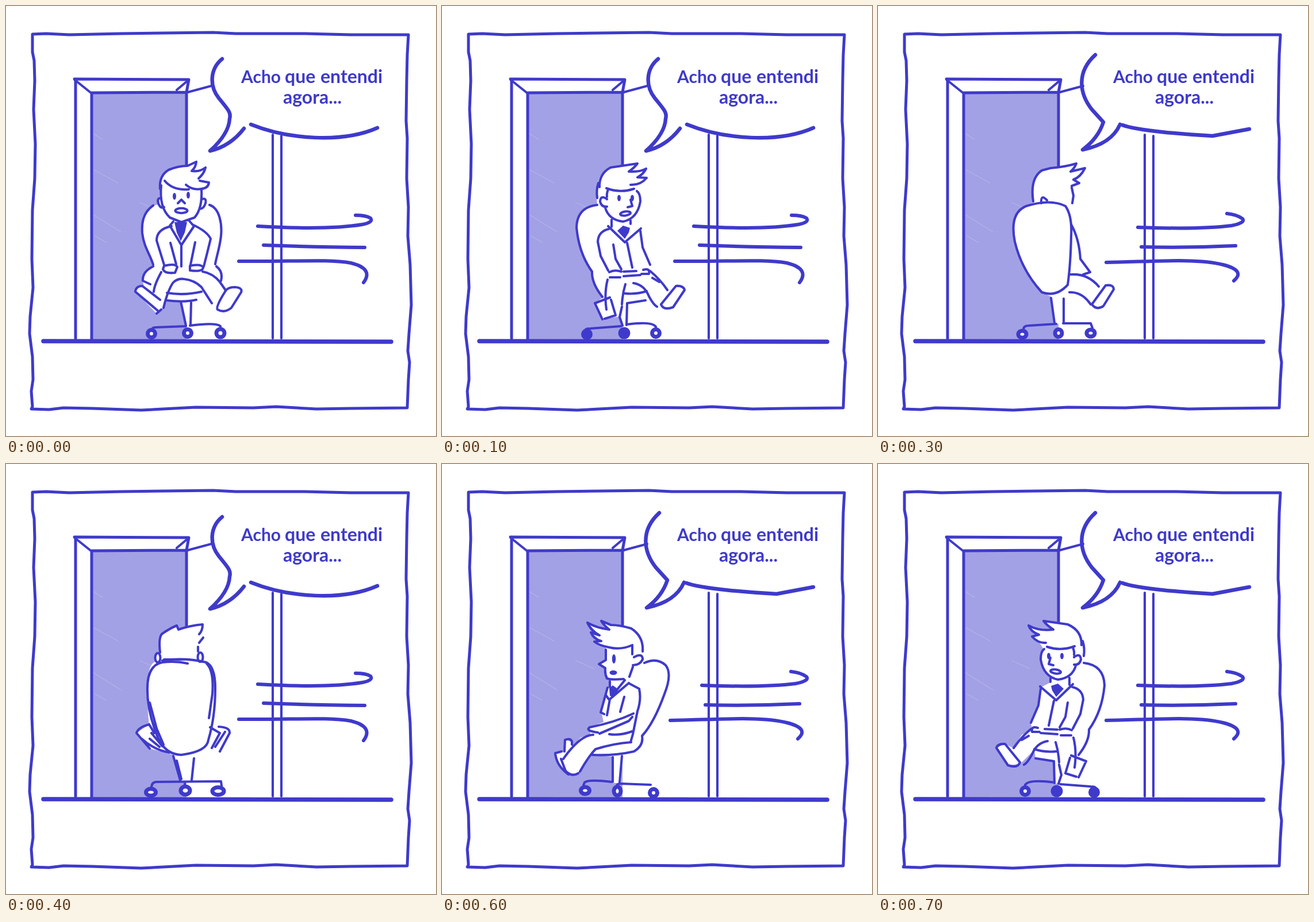
Recreate the animation shown at these times as an HTML page. Size 748 by 748 pixels, loop 0.8 s.

```html
<!DOCTYPE html>
<html lang="pt">
<head>
<meta charset="utf-8">
<title>Acho que entendi agora</title>
<style>
html, body { margin: 0; height: 100%; overflow: hidden; background: #fff; }
svg { display: block; width: 100vw; height: 100vh; }
path, circle, ellipse { fill: none; stroke: #3f3acb; stroke-width: 4.1; stroke-linecap: round; stroke-linejoin: round; }
.white { fill: #fff; stroke: none; }
.ink { fill: #3f3acb; stroke: none; }
.wheel { fill: #fff; stroke-width: 7; }
.door { fill: #a3a1e5; stroke: none; }
.streak { stroke: #b3b1ea; stroke-width: 1.2; }
.mid { stroke-width: 5; }
.wind { stroke-width: 6; }
.bold { stroke-width: 6.5; }
.floor { stroke-width: 7.5; }
text { font: 700 32px Lato, "Open Sans", sans-serif; fill: #3f3acb; }
.thin { font-size: 30px; }
</style>
</head>
<body>
<svg viewBox="0 0 748 748">
<defs>
  <g id="front">
    <path class="white" d="M268 318Q266 290 283 285L316 278 331 271 323 287 347 281 336 300 353 307Q352 317 341 319V336Q350 335 346 346L354 346C372 352 376 380 374 400L365 453Q378 462 374 478L381 493Q390 486 411 492L392 525Q378 537 366 527L340 490 340 497 331 511 322 515 321 557H313L304 514 279 512 273 525 262 535 225 497Q226 484 240 489L238 478Q238 462 256 453C248 428 240 420 237 395 235 370 240 350 266 345Z"/>
    <path d="M256 347C237 360 236 380 237 395 240 420 250 430 256 450M354 346C372 352 376 380 374 400 372 420 365 440 364 449M256 453Q237 462 238 478L251 484M366 453Q378 462 374 478"/>
    <path d="M270 312Q266 350 285 368L305 376 328 368Q342 352 340 318M270 334Q262 334 265 343 268 353 275 350M341 336Q349 333 347 343 344 353 337 353M268 318Q266 295 283 285 300 278 316 278L331 271Q330 281 323 287 337 289 347 281 345 291 335 300M276 304Q290 321 318 319M313 311Q325 321 340 318 352 317 353 307L337 304"/>
    <path d="M299 343L305 337 311 343"/>
    <ellipse cx="305" cy="356" rx="10.5" ry="4.2"/>
    <ellipse class="ink" cx="293" cy="331" rx="3" ry="6"/>
    <ellipse class="ink" cx="317" cy="329" rx="3" ry="6"/>
    <path d="M291 375L285 382 305 416 327 383 318 373M288 383Q262 388 262 408L275 450M324 380Q350 392 356 405 350 430 344 453M286 412L296 449M329 411L321 450M305 416V453"/>
    <path class="ink" d="M293 376H315L311 394 304 409 297 394Z"/>
    <path d="M275 452Q295 447 298 454L294 464Q276 466 273 458ZM320 452Q340 448 343 455 342 463 320 460Z"/>
    <path d="M270 463Q258 485 257 497M274 525Q281 496 290 482 298 473 310 475 328 477 340 489L358 517M342 462Q360 465 372 480L381 493M237 487Q226 487 225 497L264 530M237 487L268 511M270 528L262 535M381 497Q385 489 398 489 412 490 409 498L392 525Q380 535 368 528 364 524 381 497"/>
    <path d="M280 499Q310 504 340 497M279 512Q310 516 331 511M304 514L313 556M322 516L321 556M254 564Q254 559 260 559L313 557M320 556Q365 550 373 557V563"/>
    <circle class="wheel" cx="253" cy="570" r="6.5"/><circle class="wheel" cx="316" cy="569" r="6.5"/><circle class="wheel" cx="373" cy="569" r="7"/>
  </g>

  <g id="turn">
    <path class="white" d="M272 308Q273 290 293 281L338 276 327 288 354 285 340 298 354 300 340 322Q352 350 328 372V380L346 389 349 420 362 452 359 464 378 471 393 494 407 487 422 494 402 524 381 522 356 497 354 512 322 517 321 556H314L309 540 279 545 266 517 280 507Q260 480 261 462 238 430 234 385 235 350 270 346 268 325 272 308Z"/>
    <path d="M270 346Q235 350 234 385 238 430 261 462 260 482 279 506"/>
    <path d="M272 308Q268 320 270 334M289 319Q286 327 287 332M287 336Q276 328 275 340 277 350 287 349M284 351Q290 372 315 375 340 370 345 340 345 326 339 322M286 317Q310 326 334 318M323 350L331 348 328 337M295 372V384M328 373V379"/>
    <ellipse cx="319" cy="361" rx="9" ry="3.5" transform="rotate(-8 319 361)"/>
    <ellipse class="ink" cx="308" cy="334" rx="3" ry="5.5"/>
    <ellipse class="ink" cx="331" cy="334" rx="3" ry="5.5"/>
    <path class="ink" d="M305 391L315 382 327 386 325 394 318 405Z"/>
    <path d="M289 383L318 411 346 387M290 388Q272 392 271 410L276 435 289 460M298 415L302 440 312 458M322 412L331 455M345 391L349 420 362 450M291 463Q300 458 312 462M292 472H310M316 470L345 468M316 462L338 461M350 459Q362 455 360 466L347 466"/>
    <path d="M288 476Q282 500 286 528M319 484Q314 500 313 519M333 482Q352 485 360 505 368 520 374 523M362 461Q380 476 392 494M366 473L378 480M292 507L266 517 279 545M283 544L302 538 294 511M381 519L407 487Q420 486 422 494L402 524Q385 530 381 519"/>
    <path d="M318 500Q338 502 356 496M322 517L354 512M313 523L309 541 314 556M322 517L321 555M250 564Q249 561 258 561L311 557M321 554Q365 548 372 558V564"/>
    <circle class="ink" cx="252" cy="571" r="10"/><circle class="ink" cx="317" cy="569" r="10.5"/>
    <circle class="wheel" cx="372" cy="569" r="6.5"/>
  </g>
  <path id="hairA" d="M274 315Q273 292 293 281L340 274Q335 281 325 288 345 289 355 283 350 293 340 298L356 299Q345 312 328 311"/>
  <path id="hairB" d="M274 315Q273 290 298 279L340 273Q335 280 323 288 348 291 366 281 362 292 348 297L360 300Q350 312 336 311" style="fill:#fff"/>
  <g id="right"><use href="#turn"/><use href="#hairA"/></g>
  <g id="left" transform="matrix(-1 0 0 1 628 0)"><use href="#turn"/><use href="#hairB"/></g>

  <g id="side">
    <path class="white" d="M271 330Q266 300 290 285L325 280 342 273 328 288 366 276 345 298 360 293 342 308 354 309 334 320V341L346 348 335 354 332 374 326 378 342 430 338 449 362 458 361 470 378 476 393 494V484L405 479 407 501 422 503Q420 525 395 541L381 538 358 506 322 509V555H307L305 507 285 500Q268 490 271 473 250 450 232 400 220 365 230 350 245 336 267 346Z"/>
    <path d="M267 346Q245 336 230 350 218 365 232 400 250 450 271 473 268 490 285 500 320 508 358 506"/>
    <path d="M270 326Q268 300 290 286 310 280 325 280L342 273Q338 280 328 288 350 285 366 276 360 290 345 298L360 293Q355 305 342 308L354 309Q345 316 328 319 308 324 288 315L288 331M285 336Q270 328 270 340 275 350 287 350M287 353L293 370M303 374Q325 376 332 373 336 365 335 355L346 348 334 341V323"/>
    <ellipse class="ink" cx="320" cy="339" rx="3.2" ry="8"/>
    <ellipse class="ink" cx="321" cy="363" rx="6.5" ry="4"/>
    <path class="ink" d="M315 390L322 385 328 390 327 403 321 407Z"/>
    <path d="M301 376L322 402M294 381L327 409 332 437M327 378V388M293 382L276 391Q272 410 279 430L287 470 291 484M331 389L343 432 337 435M302 405L309 431M329 409L334 402M286 434Q320 450 362 458 371 464 348 467M288 440L294 447 345 469M288 465Q310 473 328 470"/>
    <path d="M290 484Q320 486 352 496 365 510 379 535M356 471Q379 472 408 513M382 538Q393 545 404 534L412 513M393 488V483Q395 476 405 480L406 500M411 500L422 503Q420 525 399 540"/>
    <path d="M306 508L310 554M322 510V553M256 558L308 556Q315 556 315 560M324 553Q365 548 371 554L373 559"/>
    <ellipse class="wheel" cx="251" cy="572" rx="6.5" ry="6.5"/><ellipse class="wheel" cx="314" cy="569" rx="6" ry="7.5"/><ellipse class="wheel" cx="370" cy="568" rx="7.5" ry="6"/>
  </g>

  <g id="away">
    <path class="white" d="M270 342Q264 300 285 286L345 274 335 288 360 282 340 302 350 308 338 315V350Q355 410 353 440L385 488 410 488 392 525 372 522 335 500 322 509 322 553H306L302 506 285 498Q250 460 238 410 228 360 258 348Z"/>
    <path d="M258 348Q300 335 326 348 338 365 336 400 335 450 330 485 310 507 285 498 250 460 238 410 228 360 258 348"/>
    <path d="M270 340Q264 300 285 286L300 282Q325 280 345 274 342 282 335 288L360 282Q352 298 340 302L350 308 337 313M337 316L340 330 338 343M294 338Q283 326 284 343M336 380Q350 405 352 440L369 463 357 467M335 467Q365 465 384 488M333 498Q355 497 370 519M372 519L396 486Q410 484 410 493L392 522Q380 530 372 519"/>
    <path d="M301 508L307 551M323 509V551M253 563Q253 556 262 556L310 553M322 552L370 552 373 560"/>
    <ellipse class="wheel" cx="251" cy="571" rx="7" ry="6"/><ellipse class="wheel" cx="314" cy="569" rx="6" ry="6.5"/><ellipse class="wheel" cx="370" cy="569" rx="7" ry="6"/>
  </g>

  <g id="back">
    <path class="white" d="M268 342Q265 300 272 293L297 281 300 288 342 279 336 296 343 302 334 318 334 330Q346 328 342 342 364 350 364 390L355 458 389 460 372 500 350 499 326 507 322 552H303L291 506 250 495 227 468 249 453Q246 430 246 390 246 350 259 344 260 327 268 330Z"/>
    <path d="M268 328Q265 300 272 295 285 286 297 281L300 288Q320 281 342 279 342 290 336 296M343 302L336 311M334 318V326"/>
    <ellipse cx="264" cy="337" rx="4.5" ry="8"/><ellipse cx="338" cy="336" rx="4.5" ry="8"/>
    <path d="M272 342Q310 336 348 345 364 352 364 390 364 440 352 480 350 500 305 506 278 505 265 478 245 430 246 390 246 350 272 345 295 342 316 347M349 347Q362 360 359 400L353 442M250 415L262 460 274 488M275 340H320"/>
    <path d="M249 453Q230 458 227 468L250 495M249 453L258 468M236 478Q257 497 284 502M253 468L272 491M250 478L267 492M355 458L372 468M370 457Q390 458 389 468L372 500M381 466L364 492M372 468L358 494"/>
    <path d="M291 508L303 550M297 516L305 548M327 512L323 550M253 562Q254 553 262 553L374 552 375 560M311 553V560"/>
    <ellipse class="wheel" cx="252" cy="571" rx="8.5" ry="6"/><ellipse class="wheel" cx="312" cy="568" rx="8" ry="7"/><ellipse class="wheel" cx="369" cy="569" rx="10" ry="6.5"/>
  </g>
</defs>

<path class="mid" d="M46 49L70 48 110 50 200 48 360 46 400 48 520 48 600 50 700 50 698 85 697 130 696 200 698 230 697 300 700 350 699 400 703 450 705 520 701 570 699 600 702 620 700 650 698 699 600 700 540 701 470 697 430 699 330 698 235 703 150 700 100 699 75 702 44 701 46 697 44 670 47 650 46 610 41 570 42 540 47 490 45 440 46 355 50 300 51 240 48 180 50 130 49 95 46 80Z"/>
<path class="door" d="M149 151H314V581H149Z"/>
<path class="streak" d="M152 363L200 393M155 400L174 411M233 342L264 356M153 285L195 308M152 222L168 232"/>
<path class="mid" d="M121 128V578M119 127L318 128 314 150M149 580V151L316 150M314 150V290"/>
<path d="M119 128L149 152M316 130L297 146M316 150L357 139M464 224V578M479 226V578"/>
<path class="floor" d="M65 583L670 584"/>

<g id="windA">
  <path class="bold" d="M376 92C354 110 354 140 370 160S392 185 389 196Q388 222 355 252 390 244 414 213M426 206C490 232 585 239 646 212"/>
  <path class="wind" d="M438 383Q560 390 620 380 640 376 634 369 626 364 608 364M448 416Q530 419 624 420M405 444C500 445 560 440 600 447Q640 457 622 481"/>
</g>
<g id="windB">
  <path class="bold" d="M378 85C345 115 350 152 372 180L392 202Q383 230 356 250 406 240 421 206M425 207C450 217 540 224 582 226L646 214"/>
  <path class="wind" d="M452 385Q560 389 615 382 640 377 634 370 625 363 607 361M458 419Q540 421 622 417M397 446C470 445 555 438 600 450Q640 460 619 478"/>
</g>
<text y="134"><tspan class="thin" x="409">Acho</tspan> <tspan x="485">que</tspan> <tspan x="547">entendi</tspan></text>
<text x="533" y="170" text-anchor="middle">agora...</text>
<use id="man" href="#front"/>
</svg>
<script>
const [man, windA, windB] = ["man", "windA", "windB"].map(id => document.getElementById(id));
const poses = ["front", "right", "side", "away", "back", "away", "side", "left"];
let last = -1;

function draw() {
  const step = Math.floor(performance.now() / 100) % poses.length;
  if (step !== last) {
    last = step;
    man.setAttribute("href", "#" + poses[step]);
    // The second half of the spin mirrors the first.
    man.setAttribute("transform", step === 5 || step === 6 ? "matrix(-1 0 0 1 619 0)" : "");
    const second = step & 2;
    windA.style.display = second ? "none" : "";
    windB.style.display = second ? "" : "none";
  }
  requestAnimationFrame(draw);
}
draw();
</script>
</body>
</html>
```
